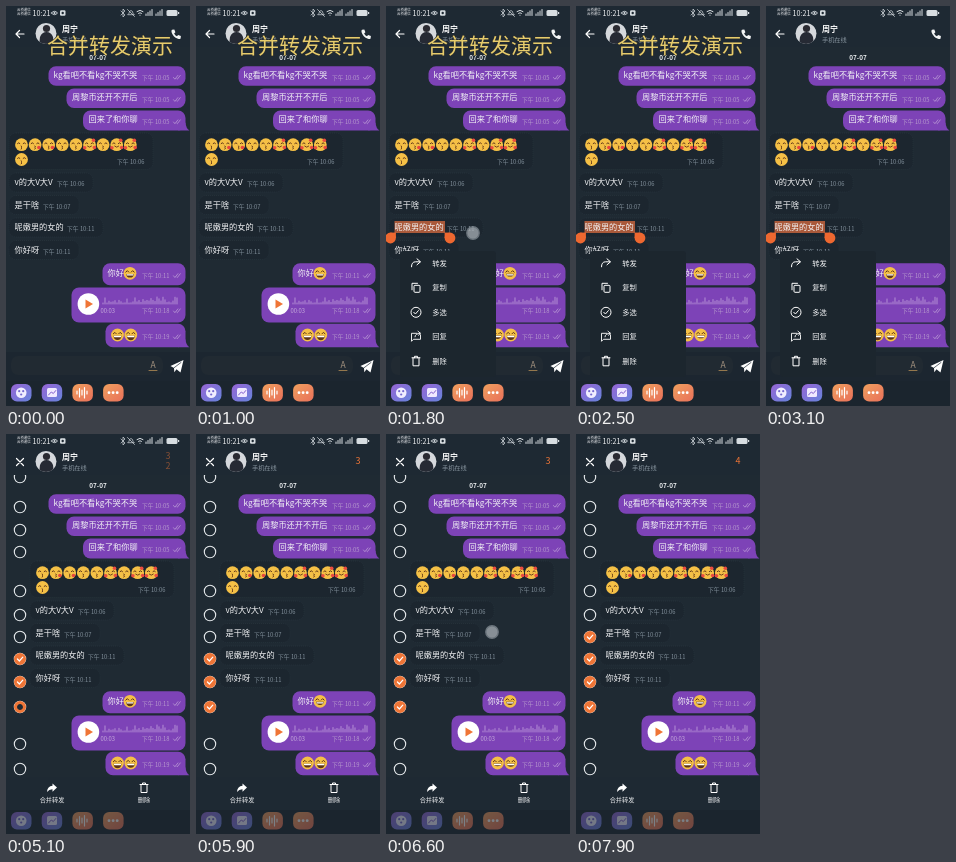
Recreate the animation shown at these times as an HTML page. Size 184 by 400 pixels, loop 8000 ms.

```html
<!DOCTYPE html>
<html lang="zh">
<head>
<meta charset="utf-8">
<style>
html, body { margin: 0; width: 100%; height: 100%; overflow: hidden; background: #1b252e; }
svg { display: block; width: 184px; height: 400px; }
text { font-family: "Noto Sans CJK SC", "Noto Sans", sans-serif; white-space: pre; }
</style>
</head>
<body>
<svg id="stage" viewBox="0 0 184 400"></svg>
<script>
const LOOP = 8000, PURPLE = '#7d43b7', ORANGE = '#ef7536', PANEL = '#1e2933', CHAT = '#1f2a33', BASE = '#1b252e';
const $ = id => document.getElementById(id);

// Text placed by its vertical centre
const text = (x, y, s, size = 8.2, fill = '#f2f3f5', more = '') =>
  `<text x="${x}" y="${y + size * .36}" font-size="${size}" fill="${fill}" ${more}>${s}</text>`;
const rect = (x, y, w, h, fill, r = 0, more = '') =>
  `<rect x="${x}" y="${y}" width="${w}" height="${h}" rx="${r}" fill="${fill}" ${more}/>`;
const disc = (x, y, r, fill, more = '') => `<circle cx="${x}" cy="${y}" r="${r}" fill="${fill}" ${more}/>`;
const line = (d, color = '#fff', w = 1, more = '') =>
  `<path d="${d}" fill="none" stroke="${color}" stroke-width="${w}" stroke-linecap="round" stroke-linejoin="round" ${more}/>`;
const group = (id, body) => `<g id="${id}">${body}</g>`;
const at = (x, y, body) => `<g transform="translate(${x} ${y})">${body}</g>`;
const blend = (id, a, b) =>
  `<linearGradient id="${id}" x2="1" y2="1"><stop stop-color="${a}"/><stop offset="1" stop-color="${b}"/></linearGradient>`;
const middle = 'text-anchor="middle"';

function face(x, y, kind) {
  const brown = '#5e3518';
  const eyes = kind === 'laugh'
    ? line('M-4.2-1.2l1.6-1.4 1.4 1.4M1.2-1.2l1.4-1.4 1.6 1.4', brown, 1)
    : line('M-4-1.2q1.2-1.6 2.4 0M1.6-1.2q1.2-1.6 2.4 0', brown, 1);
  const kiss = line('M-.4 1.3q2 .6 0 1.5q2 .8 0 1.6', brown, .9);
  const mouths = {
    kiss,
    heart: kiss + disc(3.8, 2.8, 1.8, '#e9453d'),
    love: line('M-2 1.5q2 2.2 4 0', brown, .9) +
      [[-4.8, 3], [4.9, 2.8], [4, -4.4]].map(p => disc(...p, 1.8, '#eb4b40')).join(''),
    laugh: `<path class="mouth" d="M-4 .7h8q-.4 4.3-4 4.3t-4-4.3" fill="${brown}"/>` +
      line('M-3 1.5h6', '#fff', 1.3)
  };
  return at(x, y, disc(0, 0, 6.4, '#f5c046') + eyes + mouths[kind]);
}

const stamp = (x, y, time, mine) =>
  text(x, y, '下午 ' + time, 5.8, mine ? '#b69acd' : '#82909b') +
  (mine ? line(`M${x + 31.5} ${y}l1.4 1.7 3-3.8m-1 3.4l.4.4 3-3.8`, '#c3a6da', .7) : '');

// Outgoing bubble; the last one of a run has a tail
const bubble = (x, y, h, tail) => rect(x, y, 179.5 - x, h, PURPLE, 7.5) +
  (tail ? `<path d="M172 ${y + h}h11.5q-3.5-2-4-8z" fill="${PURPLE}"/>` : '');
const sent = (x, y, h, body, time, tail) =>
  bubble(x, y, h, tail) + body + stamp(136, y + h / 2 + 1.5, time, true);

const box = (y, w, h) =>
  rect(3, y, w, h, '#1c262f', 7, 'stroke="#2b3741" stroke-width=".6" stroke-dasharray="1 1"');
const got = (y, w, s, tx, time) =>
  box(y - 9.5, w, 19) + text(8.5, y, s) + stamp(tx, y + 1.5, time);

function wave() {
  let d = '';
  for (let i = 0; i < 38; i++) {
    const noise = Math.abs(Math.sin(i * 12.9898) * 43758.5453) % 1;
    d += `M${97 + i * 2} 298v${-1 - 6 * noise * noise}`;
  }
  return line(d, '#bc98da', .9);
}

const kinds = ['kiss', 'heart', 'heart', 'kiss', 'kiss', 'love', 'kiss', 'love', 'love'];
const right =
  sent(42.5, 60.3, 19.4, text(47.5, 69, 'kg看吧不看kg不哭不哭'), '10:05') +
  sent(60.5, 82.5, 19.4, text(66, 91, '周黎币还开不开后'), '10:05') +
  sent(77, 104.5, 20, text(82.5, 113.5, '回来了和你聊'), '10:05', true) +
  sent(96.5, 257.3, 22, text(101.5, 267.5, '你好') + face(124, 267.3, 'laugh'), '10:11') +
  bubble(65.5, 281.5, 35) + disc(82.4, 298, 10.8, '#fff') +
  `<path d="M79.5 293.5v9l7.5-4.5z" fill="${ORANGE}"/>` + wave() +
  text(94.5, 305, '00:03', 5.8, '#c6abdc') + stamp(136, 305, '10:18', true) +
  sent(99.5, 317.8, 23.5, face(111.5, 329, 'laugh') + face(124.8, 329, 'laugh'), '10:19', true);

const left =
  box(127, 144, 36.5) +
  kinds.map((k, i) => face(15.5 + i * 13.6, 138.7, k)).join('') + face(15.5, 153.5, 'kiss') +
  stamp(111, 155.5, '10:06') +
  got(176.5, 84, 'v的大V大V', 51, '10:06') +
  got(199, 70, '是干啥', 37, '10:07') +
  got(221.5, 94, '呢嫩男的女的', 61, '10:11') +
  group('mark', rect(8.5, 215, 50.5, 12, '#a9593a') + text(8.5, 221.5, '呢嫩男的女的')) +
  got(244, 70, '你好呀', 37, '10:11');

// Selection circles: vertical place and the moment each one is ticked
const ticks = { 203: 6780, 225: 3600, 248: 4560, 273: 5000 };
const rows = [43, 73, 96, 118, 157, 181, 203, 225, 248, 273, 310, 335];
const circles = rows.map(y => at(14, y,
  disc(0, 0, 5.7, CHAT, 'stroke="#e6eaed" stroke-width="1.1"') +
  (ticks[y] ? disc(0, 0, 0, 'none', `id="fill${y}" stroke="${ORANGE}"`) +
    line('M-2.6 0l2 2 3.4-3.9', '#fff', 1.2, `id="tick${y}"`) : ''))).join('');

const signal = x => line(`M${x} 9.5v-1.5m2 1.5v-3m2 3v-4.5m2 4.5v-6`, '#d7dde1', 1);
const status =
  text(11, 4, '云桥通信', 3.4) + text(11, 8.2, '云桥通信', 3.4) + text(26.5, 7, '10:21', 7.2) +
  line('M45.5 7q3-3.5 6 0q-3 3.5-6 0z', '#d7dde1', .9) + disc(48.5, 7, 1, '#d7dde1') +
  rect(54, 4.3, 5.5, 5.5, '#d7dde1', 1.2) + disc(56.7, 7, 1.2, PANEL) +
  line('M115 5l4 4-2 2V3l2 2-4 4M122 8.5q1.5-1 1.5-3q1.5-2 3 0 0 2 1.5 3zM121.5 3.5l7 7', '#d7dde1', .7) +
  line('M131 5.5q3-2.5 6 0M132.5 7.3q1.5-1.3 3 0M134 9.2v.1', '#d7dde1', 1) +
  signal(140) + signal(150) +
  rect(160.5, 4, 11, 6, '#d7dde1', 1.5) + rect(172, 6, 1.2, 2, '#d7dde1');

const header = rect(0, 0, 184, 41, PANEL) + status +
  '<clipPath id="round"><circle cx="40" cy="27.5" r="10.5"/></clipPath><g clip-path="url(#round)">' +
  disc(40, 27.5, 11, '#d5d8dc') + disc(40.5, 22.5, 3.6, '#2a2a31') +
  '<path d="M33 40l1-9q2-5 6.500-5t6.500 5l1 9z" fill="#262a34"/></g>' +
  text(56, 23, '周宁', 8, '#fff', 'font-weight="700"') + text(56, 33.5, '手机在线', 6.2, '#8996a0') +
  group('back', line('M18 28h-8m3.5-3.5L10 28l3.5 3.5', '#fff', 1.2)) +
  group('close', line('M10.5 24.5l7 7m0-7l-7 7', '#fff', 1.2)) +
  group('phone', '<path d="M166 23.800l2.300-.3 1.100 2.700-1.300 1.300q1 1.900 2.800 2.800l1.300-1.300 2.700 1.100-.3 2.300q-.9.9-2.700.3-5-1.800-6.400-6.800-.2-1.500.5-2.100z" fill="#f2f4f5"/>') +
  ['oldCount', 'newCount'].map(id => `<text id="${id}" x="162" font-size="9" fill="${ORANGE}" ${middle}></text>`).join('');

const tools = ['cool', 'cool', 'warm', 'warm'].map((c, i) =>
  rect(5 + i * 30.7, 378, 20.5, 17.5, `url(#${c})`, 6)).join('') +
  disc(15.2, 386.7, 5.3, '#f0edff') +
  [[13.2, 385.2], [17.2, 385.2], [15.2, 388.5]].map(p => disc(...p, 1.1, '#7468cf')).join('') +
  rect(41, 382, 10, 9, '#f0eaff', 1.5) + line('M42.5 389l2.800-3 2 1.500 2.500-3', '#8260cc', 1) +
  line('M71 385v3M73.5 382.500v8.500M76 384v5M78.5 381.500v10.500M81 385v3', '#fff', 1.2) +
  [103, 107.1, 111.2].map(x => disc(x, 386.7, 1.4, '#fff')).join('');

const input = rect(0, 346, 184, 29, '#1c2630') + rect(5, 350, 152, 19, '#212a32', 7) +
  text(147, 359, 'A', 8.5, '#a99783', middle) + line('M143 364.5h8', '#b08b55', .8) +
  '<path d="M164.5 360l13-6-3 12.5-4-3.2-2.2 3-.3-4.3z" fill="#fff"/>' +
  line('M168 361.8l7-5.3', '#1c2630', .7);

const trash = line('M-4-3.5h8M-1.5-3.5v-1.5h3v1.5M-3-3.5v8h6v-8');
const share = '<path d="M5-.5L.5-4.5v2.3Q-4.5-2-5 4 -3 1.2.5 1.3v2.4z" fill="#fff"/>';
const actions = rect(0, 343, 184, 33, PANEL) +
  at(46, 354, share) + text(46, 366, '合并转发', 6.2, '#f2f3f5', middle) +
  at(138, 354, trash) + text(138, 366, '删除', 6.2, '#f2f3f5', middle);

const items = [
  ['转发', line('M-4.5 3.5q0-5 4-5h4.5M1-4.5l3.5 3-3.5 3')],
  ['复制', rect(-2, -2.5, 6, 7, 'none', 1, 'stroke="#fff"') + line('M-4 2v-6.5h5.5')],
  ['多选', disc(0, 0, 5, 'none', 'stroke="#fff"') + line('M-2.2 0l1.6 1.7 3-3.4')],
  ['回复', line('M1-3.5h-5.5v8l2-2h7v-4.5M-1 0q0-3 5-3.5m-2-2l2.5 2-2 2', '#fff', .9)],
  ['删除', trash]
];
const menu = rect(14, 245, 96, 126, '#1c262e', 3) +
  items.map(([s, icon], i) => at(30, 257.3 + i * 24.5, icon + text(16.3, 0, s, 7.3))).join('');

// Round selection handle with a square corner beside the text
const handle = (x, corner) => disc(x, 232, 5.4, '#ee6830') + rect(corner, 226.6, 5.4, 5.4, '#ee6830');

$('stage').innerHTML = blend('cool', '#9664d4', '#6784dc') + blend('warm', '#f0a05e', '#e9705a') +
  rect(0, 0, 184, 346, CHAT) + rect(0, 346, 184, 54, BASE) +
  text(92, 52, '07-07', 6.4, '#eef1f3', middle + ' font-weight="600"') +
  right + group('left', left) + group('circles', circles) +
  header + group('tools', tools) + group('input', input) + group('actions', actions) +
  group('handles', handle(4.5, 4.5) + handle(64, 58.6)) +
  group('menu', menu) +
  group('caption', text(41, 39, '合并转发演示', 21, '#e6cc6c',
    'stroke="#2b2c2b" stroke-width="1" paint-order="stroke"')) +
  disc(0, 0, 6.2, '#aab1b7', 'id="touch" stroke="#858e96" stroke-width="1.4"');

const ease = (t, start, span) => {
  const p = Math.min(1, Math.max(0, (t - start) / span));
  return p * p * (3 - 2 * p);
};
const fade = (id, v) => { $(id).style.opacity = v; };

const mouths = document.querySelectorAll('.mouth');
const counts = Object.values(ticks).sort((a, b) => a - b);
const touches = [[1100, 1950, 87, 227], [6450, 6750, 106, 198]];

// The new number drops in from above while the old one drops out
function count(t) {
  const n = counts.filter(c => t >= c).length;
  const p = n ? ease(t, counts[n - 1], 200) : 0;
  const show = (id, value, y, opacity) => {
    $(id).textContent = value > 0 ? value : '';
    $(id).setAttribute('y', y);
    fade(id, opacity);
  };
  show('newCount', n, 20 + 10.3 * p, p);
  show('oldCount', n - 1, 30.3 + 10 * p, 1 - p);
}

function draw(t) {
  const mode = ease(t, 3500, 250);
  const open = ease(t, 1500, 180) * (1 - ease(t, 3400, 150));
  $('left').setAttribute('transform', `translate(${21 * mode} 0)`);
  $('circles').setAttribute('transform', `translate(${-21 * (1 - mode)} 0)`);
  for (const id of ['circles', 'close', 'actions']) fade(id, mode);
  for (const id of ['back', 'phone', 'input']) fade(id, 1 - mode);
  fade('tools', 1 - .58 * mode);
  for (const id of ['mark', 'handles', 'menu']) fade(id, open);
  const s = .85 + .15 * open;
  $('menu').setAttribute('transform', `translate(${14 * (1 - s)} ${245 * (1 - s)}) scale(${s})`);
  fade('caption', t < 2900 ? 1 : 0);

  for (const y in ticks) {
    const p = ease(t, ticks[y], 200), w = 6 * p;
    $('fill' + y).setAttribute('r', 6 - w / 2);
    $('fill' + y).setAttribute('stroke-width', w);
    fade('tick' + y, ease(p, .55, .45));
  }
  count(t);

  const hit = touches.find(([a, b]) => t >= a && t < b);
  fade('touch', hit ? .75 * ease(t, hit[0], 80) * (1 - ease(t, hit[1] - 80, 80)) : 0);
  if (hit) $('touch').setAttribute('transform', `translate(${hit[2]} ${hit[3]})`);
  mouths.forEach((m, i) =>
    m.setAttribute('transform', `scale(1 ${.85 + .2 * Math.sin(t * Math.PI / 500 + i)})`));
}

function frame(now) {
  draw(now % LOOP);
  requestAnimationFrame(frame);
}
requestAnimationFrame(frame);
</script>
</body>
</html>
```
